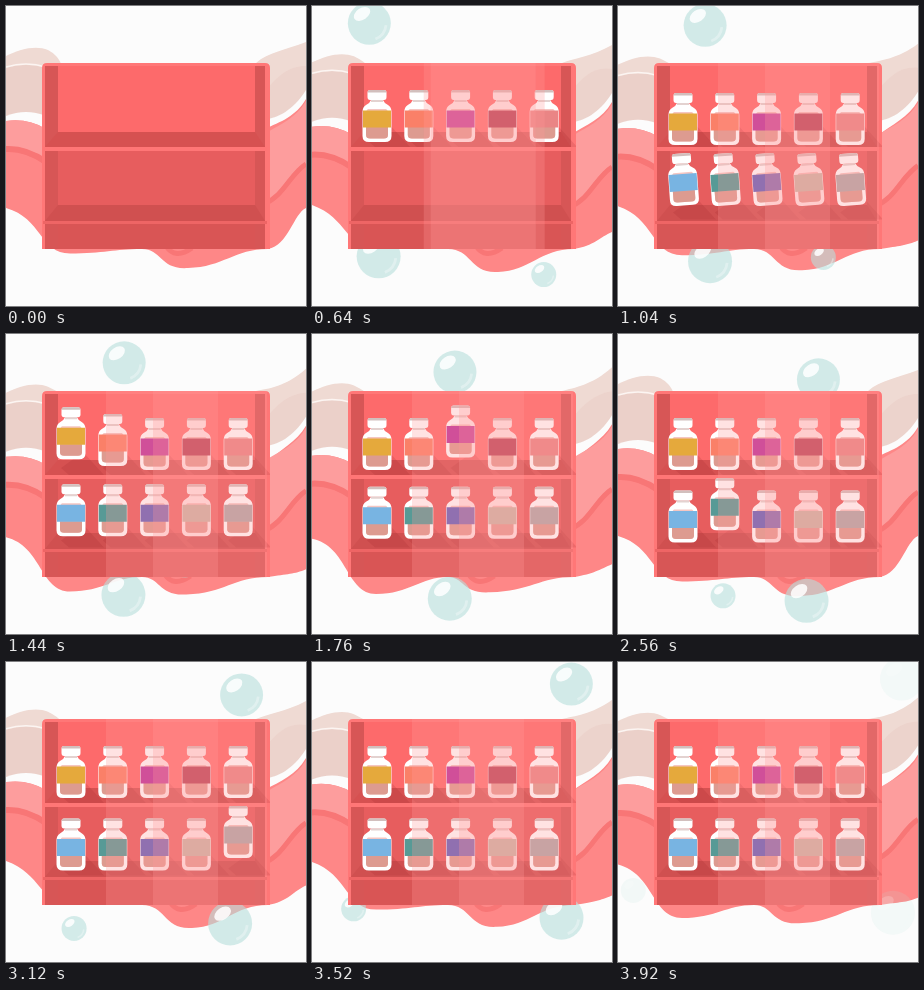
Recreate the animation shown at these times as an HTML page with a canvas. Size 300 by 300 pixels, loop 4000 ms.

```html
<!DOCTYPE html>
<html lang="en">
<head>
<meta charset="utf-8">
<title>Bottle shelf</title>
<style>
html, body { margin: 0; width: 100%; height: 100%; overflow: hidden; background: #fcfcfc; }
canvas { display: block; width: 300px; height: 300px; }
</style>
</head>
<body>
<canvas id="stage"></canvas>
<script>
const LOOP = 4000, STEP = 80, SWELL = 2560;
const stage = document.getElementById('stage');
const c = stage.getContext('2d');
const dpr = window.devicePixelRatio || 1;
stage.width = stage.height = 300 * dpr;

const { PI, sin, cos } = Math;
const ramp = (t, a, b) => Math.max(0, Math.min(1, (t - a) / (b - a)));
const ease = u => u * u * (3 - 2 * u);
const mix = (a, b, u) => a + (b - a) * u;
const arch = (t, a, b) => sin(PI * ramp(t, a, b));
const swing = (t, mid, amp, peak, period) => mid + amp * cos(2 * PI * (t - peak) / period);

// Each bubble drifts sideways while bobbing.
const bubbles = [
  { r: 21.5, x: t => 13 + .0686 * t + swing(t, 6, 6, 2400, LOOP), y: t => swing(t, 32, 15, 2350, 3200) },
  { r: 12.5, x: t => 274 - .066 * t, y: t => swing(t, 248, 22, 2900, 2400) },
  { r: 22, x: t => 26 + .0635 * t, y: t => swing(t, 257.5, 10, 2300, 4400) }
];

const labels = [
  ['#e5a93c', '#fa8068', '#bd3399', '#a92e46', '#ea8585'],
  ['#78b4e2', '#579a96', '#6561ba', '#bcbca9', '#b3a8a8']
];

function shape(color, path, alpha = 1) {
  c.globalAlpha = alpha;
  c.fillStyle = color;
  c.fill(new Path2D(path));
  c.globalAlpha = 1;
}

function line(color, width, path) {
  c.strokeStyle = color;
  c.lineWidth = width;
  c.stroke(new Path2D(path));
}

function rect(color, x, y, w, h) {
  c.fillStyle = color;
  c.fillRect(x, y, w, h);
}

function poly(color, ...p) {
  shape(color, 'M' + p.join(' ') + 'Z');
}

function drawWaves(t) {
  const p = t % SWELL / SWELL;
  const rise = sin(PI * p), sway = sin(2 * PI * p);
  const top = 42 + 9 * rise;
  const L = 114 + 8 * rise, R = 92 + 3 * sway;
  const endL = 202 - 3 * sway, endR = 202 + 34 * rise;
  const lobeL = 251 - 9 * sin(2 * PI * p + .4);
  const lobeR = 262 + 4 * sway, X = 178 + 4 * sway;

  shape('#efdad3', `M0 ${top + 8}C14 ${top + 1} 30 ${top - 3} 42 ${top + 2}
    Q52 ${top + 7} 56 60V125H0Z`);
  shape('#ebd0c9', `M0 ${top + 20}Q20 ${top + 14} 40 ${top + 20}V125H0Z`);
  line('#fcf5f2', 1.5, `M0 ${top + 19}Q20 ${top + 13} 40 ${top + 19}`);
  shape('#efdad3', `M250 57C262 ${top + 4} 280 ${top + 2} 300 ${R - 56}V130H250Z`);
  shape('#ebd0c9', `M260 84C272 70 282 60 300 ${R - 32}V130H260Z`, .7);

  shape('#fcfcfc', `M0 ${L - 4}Q20 ${L - 12} 40 ${L - 4}V150H0Z`);
  shape('#fcfcfc', `M258 ${R + 22}C272 ${R + 19} 286 ${R + 14} 300 ${R - 8}V150H258Z`);

  shape('#fe8787', `M0 ${L + 1}Q22 ${L - 2} 40 ${L + 9}H258
    C275 ${R + 24} 290 ${R + 18} 300 ${R + 1}
    V${endR}C288 ${endR + 5} 282 240 262 243
    C228 243 218 ${lobeR - 1} ${X + 4} ${lobeR}
    C${X - 24} ${lobeR + 2} ${X - 22} 243 136 243
    C108 243 98 ${lobeL} 64 ${lobeL}
    C34 ${lobeL} 36 212 0 ${endL}Z`);

  shape('#fd9d9d', `M0 ${L + 1}Q22 ${L - 2} 40 ${L + 9}V${L + 42}Q20 ${L + 28} 0 ${L + 29}Z`);
  line('#f87676', 6, `M0 ${L + 29}Q20 ${L + 28} 40 ${L + 42}`);

  const crease = `${R + 66}C284 ${R + 76} 278 ${R + 98} 258 ${R + 106}`;
  shape('#fd9d9d', `M258 ${R + 36}C275 ${R + 26} 290 ${R + 20} 300 ${R + 3}V${crease}Z`);
  line('#f87676', 5, `M300 ${crease}`);
  line('#f87676', 5, `M${X - 18} 240Q${X - 9} 254 ${X + 8} 242`);
}

function drawBubble(b, t) {
  const fade = ramp(t, 0, 400) * (1 - ramp(t, 3520, 4040));
  const dot = (color, alpha, x, y, rx, ry, turn) => {
    c.globalAlpha = alpha * fade;
    c.fillStyle = color;
    c.beginPath();
    c.ellipse(x, y, rx, ry, turn, 0, 2 * PI);
    c.fill();
  };
  c.save();
  c.translate(b.x(t), b.y(t));
  c.scale(b.r, b.r);
  dot('#b8e0dc', .6, 0, 0, 1, 1, 0);
  dot('#ffffff', .85, -.34, -.44, .42, .27, -.6);
  c.globalAlpha = .4 * fade;
  c.strokeStyle = '#f4fbfa';
  c.lineWidth = .13;
  c.beginPath();
  c.arc(0, 0, .78, .1, 1.2);
  c.stroke();
  c.restore();
}

const shelf = new Path2D('M36 243V62Q36 57 41 57H259Q264 57 264 62V243Z');

function drawShelf() {
  c.fillStyle = '#ff7777';
  c.fill(shelf);
  rect('#d75656', 39, 60, 220, 183);
  rect('#fd6a6b', 52, 60, 197, 66);
  poly('#d65151', 39, 141, 52, 126, 249, 126, 259, 141);
  rect('#ff7676', 37, 141, 224, 4);
  rect('#e75d5e', 52, 145, 197, 54);
  poly('#d05050', 39, 215, 52, 199, 249, 199, 259, 215);
  rect('#ee6565', 37, 215, 224, 3);
  rect('#d95555', 52, 218, 197, 25);
}

// Local origin: centre of the bottle's top edge.
function drawBottle(x, y, label, turn, alpha) {
  c.save();
  c.translate(x, y + 26);
  c.rotate(turn);
  c.translate(0, -26);
  shape('#ffffff', `M-6 10H6Q7 13 11 15Q14.5 17 14.5 22V46Q14.5 52 8 52H-8
    Q-14.5 52 -14.5 46V22Q-14.5 17 -11 15Q-7 13 -6 10Z`, alpha);
  shape('#f5c6c2', 'M-9 19Q-11 20 -11 24V45Q-11 48.5 -7 48.5H7Q11 48.5 11 45V24Q11 20 9 19Z', alpha);
  shape('#dd9b90', 'M-11 37H11V45Q11 48.5 7 48.5H-7Q-11 48.5 -11 45Z', alpha);
  shape(label, 'M-14 20.5H14V37.5H-14Z', alpha);
  shape('#ffffff', 'M-7 0H7Q9.5 0 9.5 3V7Q9.5 10 7 10H-7Q-9.5 10 -9.5 7V3Q-9.5 0 -7 0Z', alpha);
  shape('#d2bfbd', 'M-7 0H7Q9.5 0 9.5 2.5H-9.5Q-9.5 0 -7 0Z', alpha);
  shape('#e3d2d0', 'M-6 10H6V12H-6Z', alpha);
  c.restore();
}

function drawBottles(t) {
  labels.forEach((colors, row) => colors.forEach((color, i) => {
    const start = row ? 680 + i * 30 : 200 + i * 50;
    const show = ramp(t, start, start + 200);
    if (!show) return;

    const x = 65 + i * 41.8;
    const floor = row ? 156.5 : 84;
    const fall = -22 * (1 - ease(show));
    const settle = row ? -9 * (1 - ramp(t, 1040, 2300)) : 3 * arch(t, 660, 1420);
    const turn = row ? -.08 * (1 - ramp(t, 1000, 1400)) : 0;

    // The bottles hop one after another.
    const lift = 1210 + (row * 5 + i) * 194;
    const hop = -12.5 * arch(t, lift, lift + 340);

    poly(`rgba(150,35,40,${.16 * show})`, x + 12, floor + 34,
      x + 33, floor + 57, x - 2, floor + 57, x - 10, floor + 50);
    drawBottle(x, floor + fall + settle + hop, color, turn, show);
  }));
}

// Two panes slide apart from the middle.
function drawGlass(t) {
  const apart = ease(ramp(t, 600, 1040));
  const tint = `rgba(255,150,150,${.28 * ramp(t, 80, 480)})`;
  rect(tint, mix(112, 100, apart), 57, 112, 186);
  rect(tint, mix(118, 147, apart), 57, 114, 186);
}

function draw(t) {
  c.setTransform(dpr, 0, 0, dpr, 0, 0);
  rect('#fcfcfc', 0, 0, 300, 300);
  drawWaves(t);
  bubbles.forEach(b => drawBubble(b, t));
  drawShelf();
  c.save();
  c.clip(shelf);
  drawBottles(t);
  drawGlass(t);
  c.restore();
}

const begin = performance.now();
function tick() {
  const t = (performance.now() - begin) % LOOP;
  draw(Math.floor(t / STEP) * STEP);
  requestAnimationFrame(tick);
}
tick();
</script>
</body>
</html>
```
